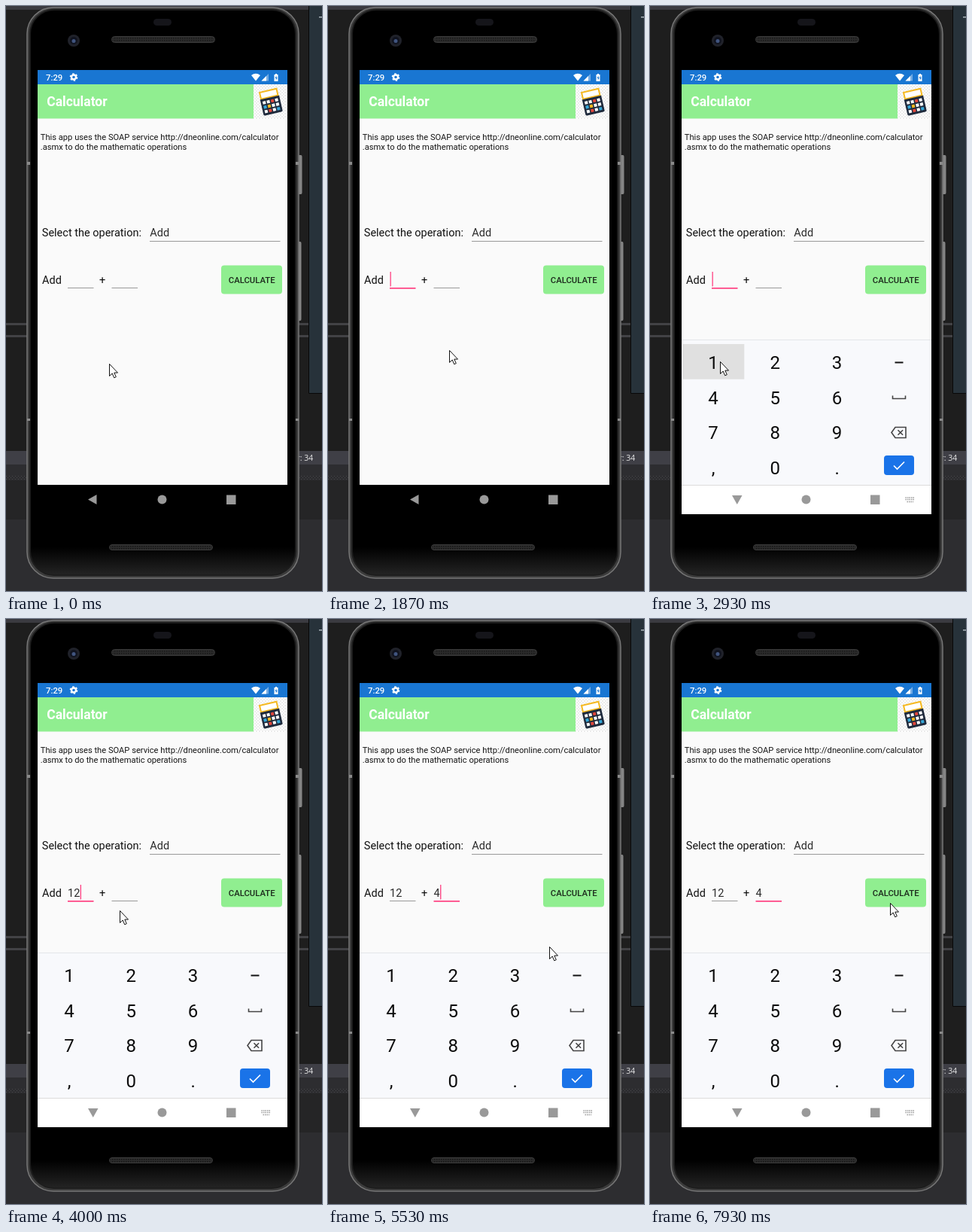
Write an HTML page that moves like this. It is 420 px wide and 777 px high and loops after 8000 ms.

```html
<!DOCTYPE html>
<html lang="en">
<head>
<meta charset="utf-8">
<title>Calculator</title>
<style>
  html, body { margin: 0; width: 100%; height: 100%; overflow: hidden; background: #1e1e1e; }
  svg { display: block; width: 420px; height: 777px; font-family: Roboto, sans-serif; }
  .body { font-size: 11.15px; fill: #151515; }
  .label { font-size: 14.5px; fill: #111; }
  .entry { font-size: 14.5px; fill: #2a2a2a; }
  .key { font-size: 24px; text-anchor: middle; fill: #0c0c0c; }
</style>
</head>
<body>
<svg viewBox="0 0 420 777">
  <defs>
    <pattern id="checker" width="4" height="4" patternUnits="userSpaceOnUse">
      <path fill="#fff" d="M0 0h4v4H0z"/><path fill="#ececec" d="M0 0h2v2H0zM2 2h2v2H2z"/>
    </pattern>
    <pattern id="dots" width="4" height="4" patternUnits="userSpaceOnUse">
      <path fill="#464649" d="M0 0h1v1H0zM2 2h1v1H2z"/>
    </pattern>
    <pattern id="mesh" width="3" height="3" patternUnits="userSpaceOnUse">
      <path fill="#2b2b2b" d="M0 0h3v3H0z"/><path fill="#161616" d="M0 0h1.5v1.5H0z"/>
    </pattern>
    <linearGradient id="face" x2="0" y2="1">
      <stop offset=".95"/><stop offset="1" stop-color="#242424"/>
    </linearGradient>
    <clipPath id="screen"><path d="M42 85h332v551H42z"/></clipPath>
  </defs>

  <!-- desktop -->
  <path fill="#1e1e1e" d="M0 0h420v777H0z"/>
  <path fill="#3a3a40" d="M0 0h402v5H0z"/>
  <path fill="#424245" d="M0 421h402v3H0zM0 437h402v3H0z"/>
  <path fill="#3f3f46" d="M0 591h420v18H0z"/>
  <path fill="#2d2d30" d="M0 609h420v168H0z"/>
  <path fill="url(#dots)" d="M0 624h420v5H0z"/>
  <path fill="#252526" d="M0 630h420v52H0z"/>
  <path fill="#27323a" stroke="#080808" d="M402.5-1h20v515.5h-20z"/>
  <path fill="#aab4ba" d="M416 14h4v1.5h-4z"/>
  <text x="386.500" y="604" font-size="10.500" fill="#e6e6e6" font-family="Open Sans, sans-serif">r: 34</text>

  <!-- phone -->
  <path fill="#858585" d="M386 198h6q1.500 0 1.500 2v48q0 2-1.500 2h-6zM386 313h5q1.500 0 1.500 2v101q0 2-1.500 2h-5z"/>
  <rect x="28" y="2" width="361" height="758" rx="35" fill="#3c3c3c" stroke="#777" stroke-width="1.500"/>
  <rect x="32" y="5" width="353" height="751" rx="32" fill="url(#face)" stroke="#1d1d1d" stroke-width="2"/>
  <path fill="#8a8a8a" d="M28 207h4v4h-4zM385 207h4v4h-4zM28 548h4v3h-4zM385 548h4v3h-4z"/>
  <rect x="196" y="17" width="24" height="9" rx="4.500" fill="#15151a"/>
  <circle cx="90" cy="46" r="8" fill="#20222a"/><circle cx="90" cy="46" r="5" fill="#10131f"/>
  <circle cx="90" cy="46.500" r="2.500" fill="#41557f"/>
  <g fill="url(#mesh)" stroke="#3b3b3b">
    <rect x="140.500" y="40.500" width="137" height="8" rx="4"/>
    <rect x="137.500" y="715.500" width="137" height="7" rx="3.500"/>
  </g>

  <!-- status bar and header -->
  <path fill="#fafafa" d="M42 85h332v551H42z"/>
  <path fill="#1976d2" d="M42 85h332v19H42z"/>
  <text x="53" y="99" font-size="11.300" font-weight="500" fill="#fff">7:29</text>
  <circle cx="90" cy="94.500" r="3" fill="none" stroke="#fff" stroke-width="2.400"/>
  <circle cx="90" cy="94.500" r="4.600" fill="none" stroke="#fff" stroke-width="1.500" stroke-dasharray="2.400 2.417"/>
  <path fill="#fff" d="M326 92q6-4.500 12 0l-6 7.500zM356.500 91h1.500v-1h2v1h1.500v9h-5z"/>
  <path fill="#fff" opacity=".4" d="M349 90v9.500h-9.500z"/>
  <path fill="#fff" d="M346 93v6.500h-6.500z"/>
  <path fill="#1976d2" d="M359.500 92.500l-2 3.300h1.300v2.700l2-3.500h-1.300z"/>
  <path fill="#90ee90" d="M42 104h287v45.500H42z"/>
  <text x="54.200" y="133" font-size="17.500" font-weight="700" fill="#fff">Calculator</text>
  <path fill="url(#checker)" d="M329 104h45v46h-45z"/>
  <g transform="translate(351.500 126.500) rotate(-13)">
    <rect x="-11.500" y="-14.500" width="23" height="9" fill="#fff" stroke="#f5b921" stroke-width="2"/>
    <path fill="#1f2a3c" d="M-13-5h26v20q0 2-2 2h-22q-2 0-2-2z"/>
    <g id="iconKeys"></g>
  </g>

  <!-- form -->
  <text class="body" x="45.800" y="177.500">This app uses the SOAP service http://dneonline.com/calculator</text>
  <text class="body" x="45.800" y="190.800">.asmx to do the mathematic operations</text>
  <text class="label" x="47.800" y="306">Select the operation:</text>
  <text class="entry" x="191.300" y="306">Add</text>
  <path fill="#999" d="M191 312h173.500v1H191z"/>
  <text class="label" x="48" y="369">Add</text>
  <text class="label" x="124" y="369">+</text>
  <text class="entry" id="first" x="82" y="368.500"></text>
  <text class="entry" id="second" x="140.500" y="368.500"></text>
  <rect id="firstLine" x="82" y="374" width="34.500"/>
  <rect id="secondLine" x="140.500" y="374" width="34.500"/>
  <rect id="caret" y="353" width="1.300" height="19.500" fill="#ff4081"/>
  <rect x="286" y="344.500" width="81" height="38" rx="4" fill="#90ee90"/>
  <text x="326.700" y="368" font-size="11.300" font-weight="500" text-anchor="middle" fill="#1c2a1c">CALCULATE</text>

  <!-- navigation bar -->
  <g fill="#999">
    <path id="navBar" d="M42 636h332v39H42z"/>
    <path id="back"/>
    <circle cx="207.500" cy="655.500" r="6"/>
    <path d="M293 649.500h12.500V662H293z"/>
  </g>
  <g id="navExtra">
    <path fill="#dcdcdc" d="M42 636h332v1H42z"/>
    <path stroke="#999" stroke-width="1.500" stroke-dasharray="1.500 1" d="M339.500 653h12.500M339.500 655.500h12.500M341.500 658.500h8.500"/>
  </g>

  <!-- keypad -->
  <g clip-path="url(#screen)"><g id="keypad">
    <path fill="#f8f9fc" d="M42 443h332v193H42z"/>
    <path fill="#e4e6e9" d="M42 443h332v1H42z"/>
    <rect id="pressed" width="82.300" height="46.700" fill="#e0e0e0"/>
    <g id="keys"></g>
    <g fill="none" stroke="#444" stroke-width="1.600">
      <path stroke="#111" stroke-width="2" d="M325.500 473.500h11"/>
      <path d="M322.500 517.500v4h17v-4"/>
      <path d="M326 559.500h14v14h-14l-5-7zM329.500 563.200l6.600 6.600M336.100 563.200l-6.600 6.600"/>
    </g>
    <rect x="311" y="597" width="40" height="26" rx="4" fill="#1a73e8"/>
    <path fill="none" stroke="#fff" stroke-width="1.700" d="M324 610.500l4.500 4.500 9.500-9.500"/>
  </g></g>

  <path id="cursor" fill="#fff" stroke="#111" d="M.5.5v16l3.700-3.500 2.500 5.800 2.600-1.100-2.500-5.600h4.700z"/>
</svg>
<script>
const el = id => document.getElementById(id);
const clamp = v => Math.min(1, Math.max(0, v));
// Times are in ticks, 15 per second.
const LOOP = 8000, TICK = 1000 / 15;
const BLINK = 7.5, KEY_HOLD = 2, DIGIT_WIDTH = 8.1, KEYS_OPEN = 30, KEYS_SLIDE = 5;
const ACCENT = "#ff4081";

const fields = [
  { id: "first", x: 82, focus: 22, presses: { 1: 44, 2: 52 } },
  { id: "second", x: 140.5, focus: 66, presses: { 4: 79 } }
];

// Pointer moves between rests: start, end, x, y
const moves = [
  [0, 0, 137, 475],
  [0, 4, 150, 450],
  [9, 18, 106, 365],
  [21, 26, 161, 457],
  [28, 41, 93, 465],
  [43, 44, 93, 472],
  [46, 51, 164, 480],
  [53, 56, 156, 429],
  [56, 62, 149, 366],
  [66, 76, 78, 536],
  [81, 83, 294, 435],
  [83, 90, 330, 357],
  [94, 100, 167, 304],
  [102, 107, 73, 372],
  [107, 115, 298, 391],
  [115, 119, 319, 377]
];

const keyCell = i => ({ x: 43 + i % 3 * 82.3, y: 449 + Math.floor(i / 3) * 46.7 });
[..."123456789,0."].forEach((char, i) => {
  const { x, y } = keyCell(i);
  el("keys").innerHTML += `<text class="key" x="${x + 41}" y="${y + 33}">${char}</text>`;
});

const iconColors = ["#fff", "#fff", "#e0463c", "#fff", "#35a7d8", "#f5b921", "#fff"];
for (let i = 0; i < 12; i++) {
  el("iconKeys").innerHTML += `<rect x="${-10.5 + i % 4 * 5.6}" y="${-2 + Math.floor(i / 4) * 6}"
    width="4" height="4" fill="${iconColors[i % 7]}"/>`;
}

function set(id, attrs) {
  for (const name in attrs) el(id).setAttribute(name, attrs[name]);
}

function pointerAt(tick) {
  let pos = [0, 0];
  for (const [start, end, ...goal] of moves) {
    const k = end > start ? clamp((tick - start) / (end - start)) : 1;
    pos = pos.map((v, i) => v + (goal[i] - v) * k);
  }
  return pos.map(Math.round);
}

function drawFields(tick) {
  const active = fields.findLast(f => tick >= f.focus);
  let pressedKey = null;
  set("caret", { opacity: 0 });
  for (const { id, x, focus, presses } of fields) {
    let text = "", lastInput = focus;
    for (const [digit, down] of Object.entries(presses)) {
      if (tick >= down + KEY_HOLD) {
        text += digit;
        lastInput = down + KEY_HOLD;
      } else if (tick >= down) pressedKey = digit;
    }
    const focused = active?.id === id;
    el(id).textContent = text;
    set(id + "Line", { height: focused ? 1.7 : 1, fill: focused ? ACCENT : "#999" });
    if (focused && (tick - lastInput) % (2 * BLINK) < BLINK) {
      set("caret", { x: x + 0.5 + text.length * DIGIT_WIDTH, opacity: 1 });
    }
  }
  set("pressed", pressedKey ? { ...keyCell(pressedKey - 1), opacity: 1 } : { opacity: 0 });
}

function drawKeypad(tick) {
  const slide = clamp((tick - KEYS_OPEN + 1) / KEYS_SLIDE);
  const open = slide > 0;
  set("keypad", { transform: `translate(0 ${193 * (1 - slide) ** 2})`, opacity: +open });
  set("navBar", { fill: open ? "#fff" : "#000" });
  set("navExtra", { opacity: +open });
  set("back", { d: open ? "M109 650h13.500l-6.750 12z" : "M120.500 649v13l-11.500-6.500z" });
}

function draw(now) {
  const tick = Math.floor((now % LOOP + 4) / TICK);
  drawFields(tick);
  drawKeypad(tick);
  set("cursor", { transform: `translate(${pointerAt(tick)})` });
  requestAnimationFrame(() => draw(performance.now()));
}
draw(0);
</script>
</body>
</html>
```
